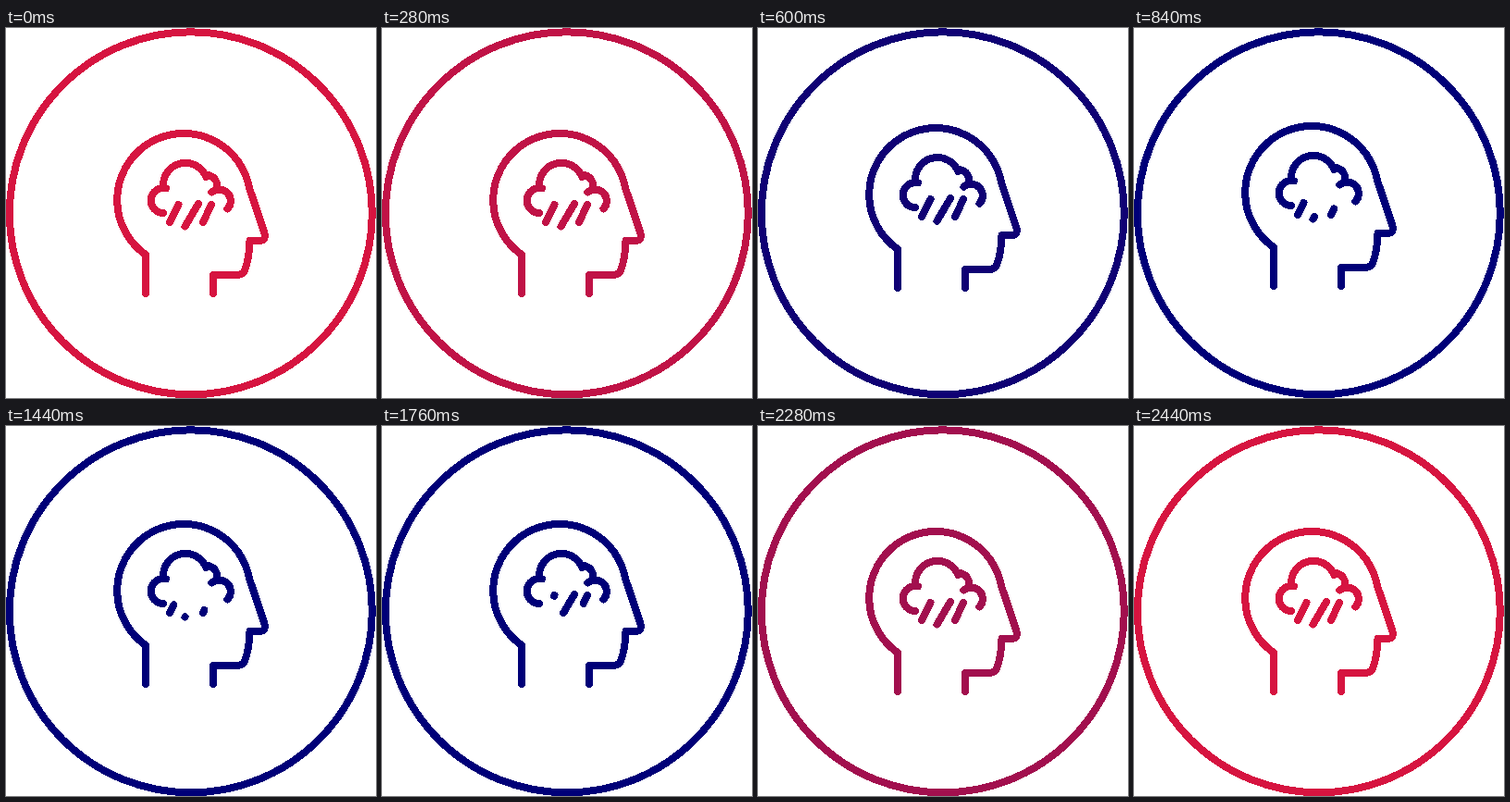
Recreate the animation shown at these times as an HTML page. Size 400x400 px, loop 2640 ms.

```html
<!DOCTYPE html>
<html lang="en">
<head>
<meta charset="utf-8">
<title>Rainy mood</title>
<style>
  html, body { margin: 0; height: 100%; overflow: hidden; background: #fff; }
  svg { display: block; width: 100%; height: 100%; }
  svg * { fill: none; stroke-linecap: round; stroke-linejoin: round; shape-rendering: crispEdges; }
</style>
</head>
<body>
<svg id="icon" viewBox="0 0 400 400" stroke-width="8">
  <circle cx="199.8" cy="200.3" r="196"/>
  <g id="head">
    <path d="M151 287V245A72 72 0 1 1 261.500 166.500Q263 174 265.500 180L279.500 222Q281 230 274 230H263.500Q263 250 258 262Q256 267 249 267H224V287"/>
    <path d="M170 200A13.500 13.500 0 1 1 173 173.300M170.200 173A24 24 0 0 1 216.300 161M217 159A11 11 0 0 1 228 170M222.500 177.500A12.400 12.400 0 0 1 239.500 195.500"/>
    <g id="rain"></g>
  </g>
</svg>
<script>
const LOOP = 2640, STEP = 40, HOLD = 160, LAST = 57;
const RED = [214, 20, 64], NAVY = [0, 0, 120];
const CYCLE = 14.4, DROP_TIME = 4;

// x1, y1, x2, y2, then the steps when a drop starts to drain and to refill
const drops = [
  [186.5, 191, 177, 210, 15.5, 25.1],
  [208, 190, 193.5, 214.5, 13.8, 22.7],
  [222, 191, 213, 210, 14.6, 23.7]
];

const icon = document.getElementById("icon");
const head = document.getElementById("head");
const rain = document.getElementById("rain");
const lines = drops.map(() => rain.appendChild(
  document.createElementNS("http://www.w3.org/2000/svg", "line")));

const mix = (a, b, k) => a + (b - a) * k;

function ease(n, from, to) {
  const k = Math.min(1, Math.max(0, (n - from) / (to - from)));
  return k * k * (3 - 2 * k);
}

function drawDrop(line, [x1, y1, x2, y2, drain, refill], n) {
  const shift = n >= drain + CYCLE ? CYCLE : 0;
  const progress = at => ease(n, at + shift, at + shift + DROP_TIME);
  const filling = n > refill + shift;
  const start = filling ? 0 : progress(drain);
  const end = filling ? progress(refill) : 1;
  const place = (name, a, b, k) => line.setAttribute(name, mix(a, b, k));
  place("x1", x1, x2, start);
  place("y1", y1, y2, start);
  place("x2", x1, x2, end);
  place("y2", y1, y2, end);
  line.style.display = end > start ? "" : "none";
}

function draw(now) {
  const t = now % LOOP;
  const n = Math.min(LAST, Math.max(0, Math.floor((t - HOLD) / STEP)));
  const blue = ease(n, 0.5, 13) - ease(n, 44.5, LAST);
  const lift = 8 * (ease(n, 2.8, 15.2) - ease(n, 40.3, 52.8));
  icon.setAttribute("stroke", `rgb(${RED.map((c, i) => Math.round(mix(c, NAVY[i], blue)))})`);
  head.setAttribute("transform", `translate(0 ${-lift})`);
  drops.forEach((drop, i) => drawDrop(lines[i], drop, n));
}

const origin = performance.now();
function tick() {
  draw(performance.now() - origin);
  requestAnimationFrame(tick);
}
tick();
</script>
</body>
</html>
```
